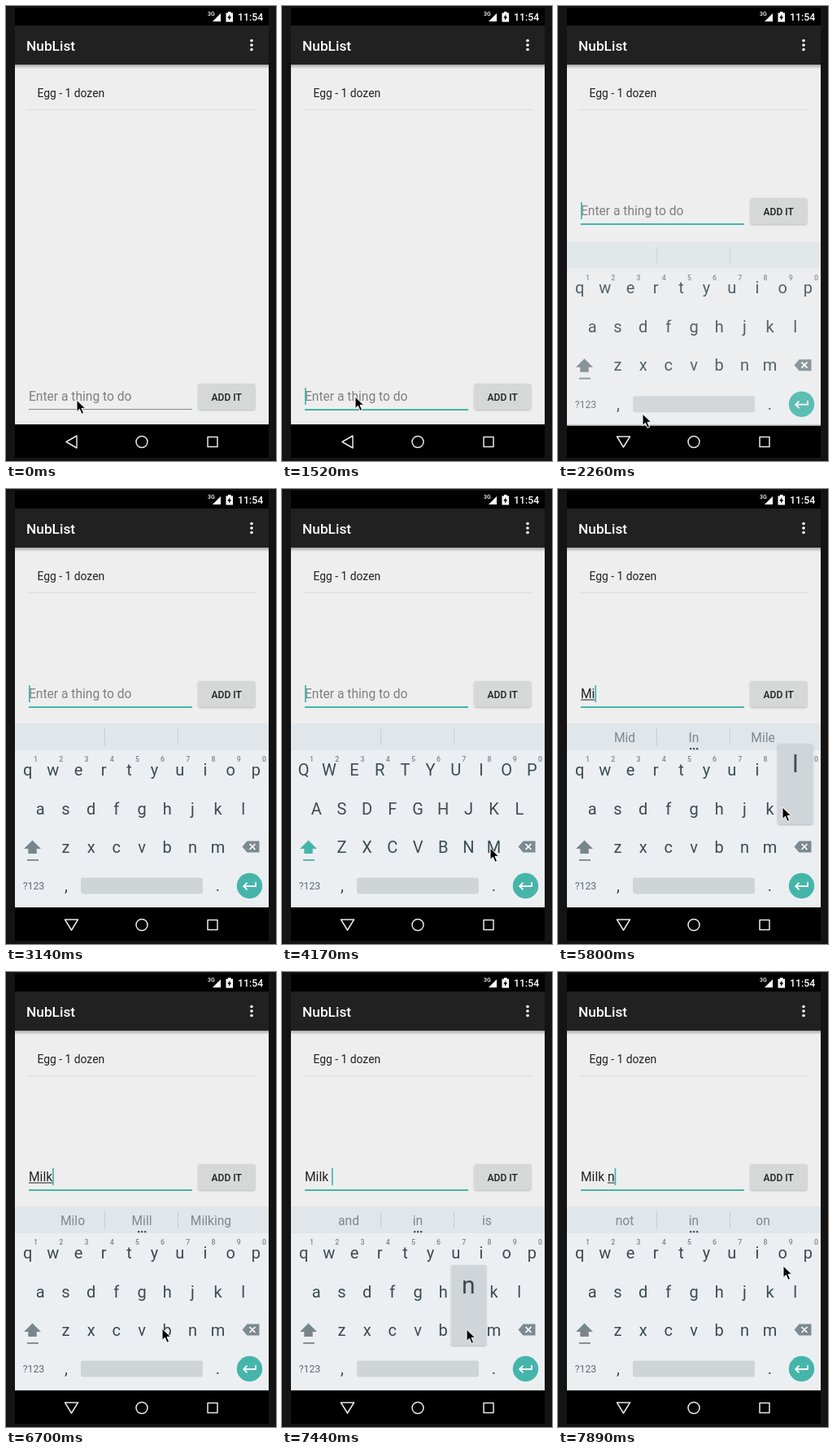
An HTML page for the animation above (8000 ms loop, 332 px wide and 559 px high).

```html
<!DOCTYPE html>
<html lang="en">
<head>
<meta charset="utf-8">
<title>To-do list</title>
<style>
  html, body { margin: 0; width: 100%; height: 100%; overflow: hidden; background: #141414; }
  svg { display: block; width: 332px; height: 559px; font-family: Roboto, sans-serif; }
  text { white-space: pre; }
</style>
</head>
<body>
<svg id="stage" viewBox="0 0 332 559"></svg>
<script>
const LOOP = 8000, TEAL = '#45b5aa', INK = '#3d4a51', FIELD_SIZE = 15.6;
const stage = document.getElementById('stage');
const ruler = document.createElement('canvas').getContext('2d');

// Each step: start time, pointer tip (null = hidden), then what differs from the step before.
// "press" and "caret" last for their own step only.
const steps = [
  [0, [87, 484], { text: '', words: [], focus: 0, raised: 0, kb: 0, drop: 0, shift: 0 }],
  [180, [89, 481]],
  [320, [90, 479]],
  [1370, [90, 479], { focus: 1 }],
  [1520, [90, 480]],
  [1670, [91, 482]],
  [1820, [93, 486], { raised: 1 }],
  [1960, [97, 492], { kb: .2, drop: 24 }],
  [2110, [101, 498], { kb: .6, drop: 8 }],
  [2260, [104, 501], { kb: .86, drop: 1.7 }],
  [2410, [104, 501], { kb: 1, drop: 0 }],
  [2550, [108, 499], { caret: 0 }],
  [2700, [134, 494], { caret: 0 }],
  [2850, [182, 482], { caret: 0 }],
  [3000, [227, 468]],
  [3140, null],
  [3580, [2, 454], { caret: 0 }],
  [3730, [28, 440], { caret: 0 }],
  [3880, [31, 438], { shift: 1 }],
  [4020, [150, 440]],
  [4170, [256, 441]],
  [4320, [259, 440], { press: 'm' }],
  [4460, [259, 425], { text: 'M', shift: 0 }],
  [4610, [258, 375]],
  [4760, [256, 340]],
  [4910, [249, 343], { press: 'i' }],
  [5060, [248, 343], { text: 'Mi' }],
  [5210, [250, 347], { words: ['Mid', 'In', 'Mile'] }],
  [5350, [256, 360]],
  [5500, [266, 376]],
  [5650, [274, 388]],
  [5800, [276, 391], { press: 'l' }],
  [5950, [275, 391], { text: 'Mil' }],
  [6100, [264, 391], { words: ['Mile', 'Mill', 'Miles'] }],
  [6250, [259, 392], { press: 'k' }],
  [6400, [254, 396], { text: 'Milk' }],
  [6550, [223, 418], { words: ['Milo', 'Mill', 'Milking'] }],
  [6700, [192, 438]],
  [6850, [179, 459]],
  [7000, [173, 485], { press: ' ' }],
  [7150, [175, 484], { text: 'Milk ', words: [] }],
  [7300, [202, 462], { words: ['and', 'in', 'is'] }],
  [7440, [227, 439], { press: 'n' }],
  [7590, [232, 432], { text: 'Milk n' }],
  [7740, [255, 397], { words: ['not', 'in', 'on'] }],
  [7890, [277, 361]]
];

let carried = {};
const states = steps.map(([time, tip, change]) => {
  carried = { ...carried, press: '', caret: 1, ...change };
  return { ...carried, time, tip };
});

const keys = {};
[['qwertyuiop', 26.6, 345], ['asdfghjkl', 42.2, 393], ['zxcvbnm', 73.4, 440]].forEach(
  ([row, x, y]) => [...row].forEach((k, i) => keys[k] = [x + 31.2 * i, y]));

const rect = (x, y, w, h, fill, more = '') =>
  `<rect x="${x}" y="${y}" width="${w}" height="${h}" fill="${fill}" ${more}/>`;
const path = (d, fill, more = '') => `<path d="${d}" fill="${fill}" ${more}/>`;
const label = (x, y, size, fill, str, more = '') =>
  `<text x="${x}" y="${y}" font-size="${size}" fill="${fill}" ${more}>${str}</text>`;
const mid = (x, y, size, fill, str, more = '') =>
  label(x, y, size, fill, str, 'text-anchor="middle" ' + more);
const dot = (x, y, r, fill, more = '') => `<circle cx="${x}" cy="${y}" r="${r}" fill="${fill}" ${more}/>`;
const medium = 'font-weight="500"';

const backdrop = `
  <defs>
    <linearGradient id="fade" x2="0" y2="1">
      <stop stop-color="#000" stop-opacity=".3"/><stop offset="1" stop-color="#000" stop-opacity="0"/>
    </linearGradient>
    <filter id="lift" x="-20%" y="-20%" width="140%" height="150%">
      <feDropShadow dx="0" dy="1" stdDeviation="1" flood-opacity=".3"/>
    </filter>
  </defs>` +
  rect(0, 0, 332, 559, '#141414') +
  rect(11, 2, 312, 553, '#000') +
  rect(11, 24, 312, 48, '#212121') +
  rect(11, 72, 312, 442, '#eee') +
  rect(11, 72, 312, 5, 'url(#fade)') +
  label(248, 12, 7, '#fff', '3G', medium) +
  path('M254 19L264 9V19Z', '#fff') +
  path('M270.5 8.5H273V7H276.5V8.5H279V19.5H270.5Z', '#fff') +
  path('M275.5 10L272.3 14.7H274.3L273.8 18L277.2 13.2H275.2Z', '#000') +
  label(285, 18, 12.3, '#fff', '11:54', medium) +
  label(25, 54.5, 17.3, '#fff', 'NubList', medium) +
  [42.5, 48, 53.5].map(y => dot(302, y, 1.8, '#fff')).join('') +
  label(38.5, 112, 13.87, '#212121', 'Egg - 1 dozen') +
  rect(25, 127, 284, 1, '#dcdcdc');

function entry(s) {
  const y = s.raised ? 252 : 480;
  const cut = s.text.lastIndexOf(' ') + 1;
  ruler.font = FIELD_SIZE + 'px Roboto, sans-serif';
  const end = 28 + ruler.measureText(s.text).width;
  const start = 28 + ruler.measureText(s.text.slice(0, cut)).width;
  return label(28, y + 5.3, FIELD_SIZE, s.text ? '#212121' : '#7f7f7f', s.text || 'Enter a thing to do') +
    (cut < s.text.length ? rect(start, y + 6.5, end - start, 1, '#212121') : '') +
    (s.focus ? rect(28, y + 15, 201, 2, TEAL) : rect(28, y + 15, 201, 1, '#888')) +
    (s.focus && s.caret ? rect(end, y - 11, 1.7, 21, TEAL) : '') +
    rect(236.5, y - 16, 69.5, 31.5, '#d6d7d7', 'rx="2" filter="url(#lift)"') +
    mid(271.2, y + 4.6, 12.1, '#212121', 'ADD IT', medium);
}

function navBar(s) {
  const line = 'stroke="#e8e8e8" stroke-width="1.5" stroke-linejoin="round"';
  return path(s.raised ? 'M72.5 529H88.5L80.5 542Z' : 'M74 535.5L87 528V543Z', 'none', line) +
    dot(167, 535.5, 7, 'none', line) + rect(248, 529.5, 12, 12, 'none', line);
}

function keyboard(s) {
  const letters = Object.entries(keys).map(([k, [x, y]], i) =>
    mid(x, y + 6.7, 20, INK, s.shift ? k.toUpperCase() : k) +
    (i < 10 ? mid(x + 10, 335, 8.8, '#78858c', (i + 1) % 10, medium) : '')).join('');
  const words = s.words.map((w, i) => mid(82 + 85 * i, 311, 15.6, '#7e898f', w)).join('');
  const more = s.words.length ? [162, 166, 170].map(x => rect(x, 318, 2.3, 2.3, '#455a64')).join('') : '';
  const shiftFill = s.shift ? TEAL : '#78868c';
  return `<g opacity="${s.kb}" transform="translate(0 ${s.drop})">` +
    rect(11, 288, 312, 33, '#e1e6ea') + rect(11, 321, 312, 193, '#eceff1') +
    rect(121, 294, 1, 21, '#c9ced2') + rect(211, 294, 1, 21, '#c9ced2') +
    words + more + letters +
    path('M32.5 431.5L43 442H37.7V448H27.3V442H22Z', shiftFill) + rect(26, 455, 14, 1.8, shiftFill) +
    path('M290.5 439.5L296.5 432.5H311.5V446.5H296.5Z', '#7d8a90') +
    path('M299.5 436L306.5 443M306.5 436L299.5 443', 'none', 'stroke="#fff" stroke-width="1.7"') +
    mid(34, 492, 12.3, '#5f6c73', '?123') +
    mid(74, 494, 20, INK, ',') + mid(260.5, 494, 20, INK, '.') +
    rect(92, 477.5, 150, 20, s.press === ' ' ? '#b6bec2' : '#cfd4d7', 'rx="3"') +
    dot(299.5, 487.5, 15.7, TEAL) +
    path('M307 483V488H292.5M296.5 483.7L292.2 488L296.5 492.3', 'none', 'stroke="#fff" stroke-width="1.8"') +
    '</g>';
}

function popup(s) {
  if (!keys[s.press]) return '';
  const [x, y] = keys[s.press];
  return rect(x - 21.5, y - 80, 43, 98.5, '#cfd5d8', 'rx="2" filter="url(#lift)"') +
    mid(x, y - 45, 30, INK, s.shift ? s.press.toUpperCase() : s.press);
}

const pointer = ([x, y]) => path(
  `M${x} ${y}v14.5l3.4-3.2 2.6 6 2.6-1.1-2.6-5.9h4.7z`, '#000',
  'stroke="#fff" stroke-width="1" stroke-linejoin="round"');

function scene(s) {
  return backdrop + entry(s) + navBar(s) + (s.kb ? keyboard(s) : '') + popup(s) +
    (s.tip ? pointer(s.tip) : '');
}

let shown;
function tick() {
  const t = performance.now() % LOOP;
  const now = states.findLast(s => s.time <= t);
  if (now !== shown) stage.innerHTML = scene(shown = now);
  requestAnimationFrame(tick);
}
tick();
</script>
</body>
</html>
```
